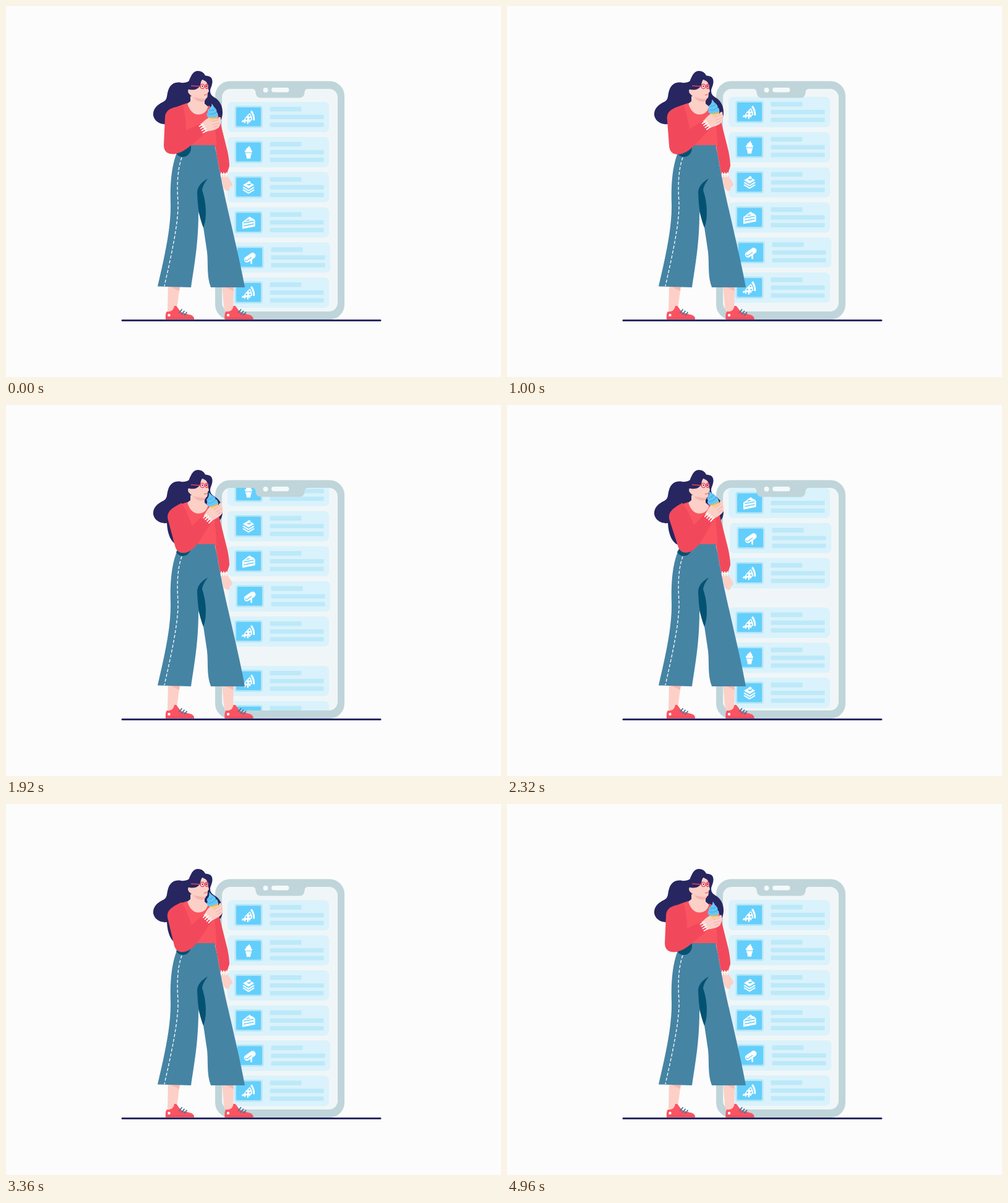
An HTML page for the animation above (5 s loop, 800x600 px).

```html
<!DOCTYPE html>
<html lang="en">
<head>
<meta charset="utf-8">
<title>Ordering dessert</title>
<style>
html, body { margin: 0; width: 100%; height: 100%; overflow: hidden; background: #fcfcfc; }
svg { display: block; width: 100vw; height: 100vh; }
</style>
</head>
<body>
<svg viewBox="0 0 800 600" xmlns="http://www.w3.org/2000/svg">
  <defs>
    <clipPath id="screen"><rect x="349" y="134" width="187" height="360" rx="14"/></clipPath>

    <g id="pizza">
      <path fill="#fff" d="M5.500 -11C9 -6 10.500 -1 10 5L7.500 5C7.500 0 6 -5 3 -9Z"/>
      <path fill="#fff" d="M2 -7C4.500 -4 6 0 6 4.500L3 5.500V7A1.200 1.200 0 0 1 .6 7V6L0 6.500V9.500A1.200 1.200 0 0 1 -2.400 9.500V6.500L-5 7V8.500A1.100 1.100 0 0 1 -7.200 8.500V7.500L-10.500 8C-11.500 7.500 -11 6 -9.500 4.500L-8 5L-5 0Z"/>
      <g fill="#64cffc"><circle cx="1.500" cy="-2.500" r="1.400"/><circle cx="-3.500" cy="2.500" r="1.500"/><circle cx="2.500" cy="2.500" r="1.400"/></g>
    </g>
    <g id="cone" fill="#fff">
      <path d="M1 -10.500C3 -9 2 -8 3 -7C5 -6 4 -4 4 -4C6.500 -3 6 0 5 0H-5C-7 -1 -6 -4 -4 -4C-4.500 -7 -1 -7 1 -10.500Z"/>
      <path d="M-5 1H5V3.500H4L3 10H-3L-4 3.500H-5Z"/>
    </g>
    <g id="layers">
      <path fill="#fff" d="M0 -9.500L9 -4L0 1.500L-9 -4Z"/>
      <path fill="none" stroke="#fff" stroke-width="2" d="M-9 -.5L0 5L9 -.5M-9 3.500L0 9L9 3.500"/>
      <path fill="#64cffc" d="M-3 -5.500Q0 -1 4 -5L3 -7.500L0 -5.500Z"/>
      <circle cx="1" cy="-8" r="2.300" fill="#fff"/>
    </g>
    <g id="cake">
      <path fill="#fff" d="M-10 -1L-1 -8L2 -10L4 -8C8 -7 10 -5 10.500 -3V6L-10 10Z"/>
      <path fill="none" stroke="#64cffc" stroke-width="1.600" d="M-8 .5L8.500 -2.500M-8 5.300L8.500 2"/>
      <path fill="#64cffc" d="M-5 -2.500L-1 -5.500L4 -4.500Z"/>
    </g>
    <g id="pop">
      <g transform="rotate(-35)">
        <rect x="-10" y="-5" width="20.500" height="9.500" rx="4.500" fill="#fff"/>
        <path fill="none" d="M3 1H-6.500A2 2 0 0 1 -7.500 -2" stroke="#64cffc" stroke-width="1.300"/>
      </g>
      <path d="M2.500 2V9" stroke="#fff" stroke-width="2.600" stroke-linecap="round"/>
    </g>
    <g id="shoe">
      <path fill="#fb5361" d="M0 21.500C-.5 14 .5 9 3 9C8 10 13 7 14 0L17 0C20 3 22 8 27 11L38 14C44 15 46 18 46 21.500Z"/>
      <path fill="#e8465a" d="M0 19.500H46V21.500H0Z"/>
      <path fill="none" stroke="#3d7c9d" stroke-width="1.900" stroke-linecap="round" d="M22 11L26 6M26 13.500L30 8.500M30.500 15L34 10.500"/>
      <circle cx="5.500" cy="15" r="2.200" fill="#fff"/>
    </g>
  </defs>

  <rect width="800" height="600" fill="#fcfcfc"/>

  <g id="phone">
    <rect x="338" y="121.500" width="209" height="385.500" rx="24" fill="#bfd5da"/>
    <rect x="349" y="134" width="187" height="360" rx="14" fill="#f0f6f7"/>
    <g clip-path="url(#screen)"><g id="list"></g></g>
    <path fill="#bfd5da" d="M396 133.500C402 134 403 136 403.500 140C404 146 407 148.500 412 148.500H474C479 148.500 482 146 482.500 140C483 136 484 134 490 133.500Z"/>
    <circle cx="419.500" cy="136" r="4" fill="#f4f9f9"/>
    <rect x="429" y="132" width="28.500" height="7.500" rx="3.700" fill="#f4f9f9"/>
  </g>

  <path d="M188 508.500H605" stroke="#2b2a62" stroke-width="3" stroke-linecap="round"/>

  <g id="legs">
    <path fill="#fcd0c7" d="M262 452H281L276 490Q268 497 261 493Z"/>
    <path fill="#f7b9b0" d="M262 452H281L280 461Z"/>
    <path fill="#fcd0c7" d="M349 452H368L367 488Q361 498 353 493Z"/>
    <path fill="#f7b9b0" d="M350 452H368L367.500 461Z"/>
    <use href="#shoe" x="258" y="485"/>
    <use href="#shoe" x="353.500" y="485"/>
  </g>

  <path id="hair" fill="#272660" d="M297 121C299 110 304 105 310 105C317 105 321 109 322.500 114C329 112 334 116 333.500 123C333 130 330 133 330 137C330 142 332 145 337 148C346 153 350 162 350 172C350 182 346 188 341 189L300 200L276 226C267 222 261 210 260 191C250 192 240 187 238 177C237 166 245 160 252 156C262 152 259 146 262 137C265 126 274 122 283 124C290 125 294 122 297 121Z"/>

  <g id="head">
    <path fill="#fcd0c7" d="M298 146L298 154L289 161L300 182H322L333 168L321 158V146Z"/>
    <path fill="#f7b5ad" d="M302 146L323 149C323 154 317 156 311 154Q305 152 302 146Z"/>
    <path fill="#fcd0c7" d="M312 122C317 118 323 118 325 123L326 130L328 138L326 140.500L325.500 147Q324 151 317 150C307 149 300 147 297 143C292 139 294 132 299 133L306 133Z"/>
    <path fill="#272660" d="M295 124C298 110 308 104 318 111C320 116 315 120 314.500 126C313 134 304 138 293 134Z"/>
    <path fill="#272660" d="M317 113C325 111 333 114 333 123C332 130 329 132 330 137C327 132 327 122 319 120Z"/>
    <path fill="none" stroke="#ee4058" stroke-width="1.500" d="M299 129L314 130"/>
    <g fill="#fff" fill-opacity=".3" stroke="#ee4058" stroke-width="1.400">
      <ellipse cx="317.500" cy="130" rx="3.200" ry="3.600"/><ellipse cx="324.500" cy="130" rx="2.200" ry="3.500"/>
    </g>
    <path stroke="#272660" stroke-width="1.500" d="M317.500 128.500V131M324.300 128.500V131"/>
    <path fill="none" stroke="#e66e72" stroke-width="1.300" d="M320 144Q323 144 325 142.500"/>
  </g>

  <g id="body">
    <path fill="#fcd0c7" d="M347 273H357C359 279 366 284 366 290L362 293L361 298Q357 301 353 296C349 291 350 282 347 273Z"/>
    <path fill="#f1495b" d="M327 162C337 164 343 172 346 187L358 235Q361 250 361 259L357 271H346L336 215L332 190Z"/>
    <path stroke="#fff" stroke-width="1.600" stroke-linecap="round" d="M348 269.500V276M352 269.500V276M356 269.500L355.500 276"/>
    <path fill="#fa5461" d="M293 157C296 169 303 176 312 175.500C320 175 325 170 327 161C334 164 337 170 337 182L340 220V228H280L274 190L271 168C277 161 285 160 293 157Z"/>
    <path fill="#4684a4" d="M283 225H337L341 243C348 292 376 398 386 455H331C324 437 327 416 325 398L319 358L311 333C311 382 305 415 299 455L245 453.500C255 410 267 360 266 320C265 290 267 262 275 240Z"/>
    <path fill="#045272" d="M326 279C316 285 309 292 309 302C310 320 310 334 319 358.500C325 344 324 318 317 298C318 290 322 285 326 279Z"/>
    <path fill="#045272" d="M275 238L282 226H299C300 238 293 244 286 244C281 244 278 242 275 238Z"/>
    <path fill="none" stroke="#fff" stroke-width="1.300" stroke-dasharray="5 3" d="M284 245C277 265 276 290 278 318C279 352 266 408 256 453"/>
  </g>

  <g id="arm">
    <path fill="#fbd174" d="M326.500 178H342.500L337 198H332Z"/>
    <path fill="#edb75c" d="M327 180H342L341.500 182H327.500Z"/>
    <g fill="#65c8f8">
      <path d="M332.500 158C336 161 335 163 337 164C340 166 339 169 338.500 170H328C326 166 333 165 332.500 158Z"/>
      <rect x="326" y="166" width="14.500" height="8" rx="4"/>
      <rect x="324.500" y="171.500" width="18" height="8.500" rx="4"/>
    </g>
    <path fill="none" stroke="#44aee5" stroke-width="1.200" d="M328 168.500Q334 170 338 166M327 174.500Q335 176 340.500 171.500"/>
    <path fill="#fcd0c7" d="M314 191C320 187 323 182 328 181C331 181 331 184 330 186L342 182C345 178 348 179 347 183C348 187 346 191 345 195C342 200 332 202 323 203Z"/>
    <path fill="none" stroke="#f2aea6" stroke-width="1" d="M333 187L344 184M334 192L345 189M335 196L343 194"/>
    <path fill="#f1495b" d="M286 161C268 164 258 167 257 180L255 225C255 236 262 240 272 239.500C291 237 305 218 322.500 206L313.500 191C304 194 297 199 291 201C291 188 289 172 286 161Z"/>
    <path stroke="#fff" stroke-width="1.800" stroke-linecap="round" d="M312.500 194.500L319 191M314.500 198L321 194.500M316.500 201.500L323 198M318.500 205L325 201.500"/>
  </g>
</svg>
<script>
const LOOP = 5000, PERIOD = 364, PITCH = 56.8;
const PEAK = 2600, SWING = 21;
const ICONS = ['pizza', 'cone', 'layers', 'cake', 'pop', 'pizza'];
const list = document.getElementById('list');
const arm = document.getElementById('arm');

const rect = (x, y, w, h, r, fill) =>
  `<rect x="${x}" y="${y}" width="${w}" height="${h}" rx="${r}" fill="${fill}"/>`;

function card(icon, x, y) {
  return `<g transform="translate(${x} ${y})">` +
    rect(0, 0, 164, 49, 7, '#daf2fb') +
    rect(11.5, 6.5, 45, 35.5, 3, '#b7e6f6') +
    rect(14, 9, 40, 30.5, 2, '#64cffc') +
    rect(68.5, 8, 51, 7.5, 0, '#bde9f9') +
    rect(68.5, 21, 87, 7, 0, '#bde9f9') +
    rect(68.5, 33.5, 87, 7, 0, '#bde9f9') +
    `<use href="#${icon}" x="34" y="25"/></g>`;
}

list.innerHTML = [0, PERIOD].map(top => ICONS.map((icon, i) =>
  card(icon, icon === 'pop' ? 360 : 358, 155 + top + i * PITCH)).join('')).join('');

const clamp = v => Math.min(1, Math.max(0, v));
const smooth = u => u * u * (3 - 2 * u);

// Cubic bezier easing with flat ends: handles (x1, 0) and (x2, 1)
function ease(u, x1, x2) {
  if (u <= 0 || u >= 1) return clamp(u);
  let lo = 0, hi = 1;
  for (let i = 0; i < 30; i++) {
    const b = (lo + hi) / 2, a = 1 - b;
    if (3 * a * a * b * x1 + 3 * a * b * b * x2 + b * b * b < u) lo = b;
    else hi = b;
  }
  return smooth(lo);
}

function draw(t) {
  const scroll = PERIOD * ease((t - 522) / 2903, .69, .598);
  list.setAttribute('transform', `translate(0 ${-scroll})`);
  const lift = t < PEAK ? smooth(t / PEAK) : 1 - smooth((t - PEAK) / (LOOP - PEAK));
  arm.setAttribute('transform', `rotate(${-SWING * lift} 277 167)`);
}

function tick() {
  draw(performance.now() % LOOP);
  requestAnimationFrame(tick);
}
tick();
</script>
</body>
</html>
```
